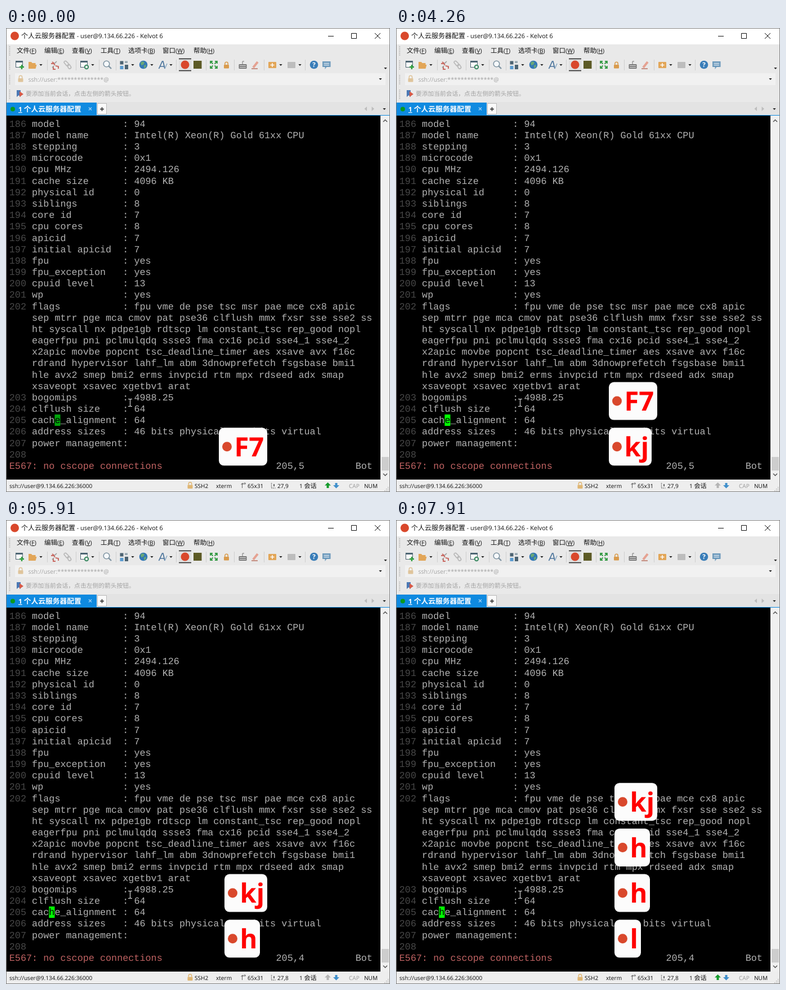
An HTML page for the animation above (8 s loop, 682 by 821 pixels).

```html
<!DOCTYPE html>
<html lang="zh-CN">
<head>
<meta charset="utf-8">
<title>Terminal key display</title>
<style>
html, body { margin: 0; width: 100%; height: 100%; overflow: hidden; background: #000; }
svg { display: block; width: 682px; height: 821px; }
text {
  font-family: "Open Sans", "Noto Sans CJK SC", "Noto Sans CJK", sans-serif;
  white-space: pre;
  text-rendering: geometricPrecision;
}
.mono { font: 16.8px "Liberation Mono", monospace; fill: #b2b2b2; }
.num { fill: #484848; }
.error { fill: #bf6262; }
.under { fill: #000; }
.key { font-weight: 700; font-size: 47px; fill: #f00; }
</style>
</head>
<body>
<svg id="stage" viewBox="0 0 682 821" xmlns="http://www.w3.org/2000/svg"></svg>
<script>
const LOGO = '#d9482c';
const COL = 10.08, ROW = 20.17, LEFT = 5.8, TOP = 159.4;

// Drawing helpers, each returning SVG markup
const rect = (x, y, w, h, color, extra = '') =>
  `<rect x="${x}" y="${y}" width="${w}" height="${h}" fill="${color}" ${extra}/>`;
const circle = (x, y, r, color, extra = '') =>
  `<circle cx="${x}" cy="${y}" r="${r}" fill="${color}" ${extra}/>`;
const fill = (d, color) => `<path d="${d}" fill="${color}"/>`;
const line = (d, color, width = 1, extra = '') =>
  `<path d="${d}" fill="none" stroke="${color}" stroke-width="${width}" ${extra}/>`;
const dotted = (d, color) => line(d, color, 1.5, 'stroke-dasharray="1.5"');
const caret = (x, y) => fill(`M${x - 2.7} ${y - 1}h5.4l-2.7 3z`, '#222');
const underline = s => `<tspan text-decoration="underline">${s}</tspan>`;

// Chinese runs are set slightly larger than the Latin ones
function label(x, y, str, size = 10.1, color = '#111', extra = '') {
  const runs = str.replace(/[\u3000-\u9fff\uff00-\uffef]+/g,
    s => `<tspan font-size="${size * 1.1}">${s}</tspan>`);
  return `<text x="${x}" y="${y}" font-size="${size}" fill="${color}" ${extra}>${runs}</text>`;
}
const mono = (col, row, str, kind = '') =>
  `<text class="mono ${kind}" x="${LEFT + col * COL}" y="${TOP + row * ROW + 15.4}">${str}</text>`;

const lock = (x, y, color) =>
  rect(x - 4.5, y - 1, 9, 6.5, color, 'rx="1"') +
  line(`M${x - 2.7} ${y - 1}v-2a2.7 2.7 0 0 1 5.4 0v2`, color, 1.5);
const folder = (x, y) =>
  fill(`M${x - 7} ${y - 6}h5l1.5 2h6v3h2l-2 7h-12.5z`, '#e2a658');
const windowIcon = (x, y) =>
  rect(x - 6.5, y - 6.5, 12, 11, '#fafafa', 'stroke="#4d6573"') +
  rect(x - 7, y - 7, 13, 3, '#4d6573');

function titleBar() {
  return rect(0, 0, 682, 29, '#fff') + circle(15.5, 14, 7.5, LOGO) +
    label(27, 18.3, '个人云服务器配置 - user@9.134.66.226 - Kelvot 6', 10.9) +
    line('M572 14.5h10M613.5 9.5h9v9h-9zM655 9l10 10M665 9l-10 10', '#111');
}

function menuBar() {
  const items = [[19, '文件', 'F'], [68, '编辑', 'E'], [117, '查看', 'V'], [168, '工具', 'T'],
    [217, '选项卡', 'B'], [278, '窗口', 'W'], [333, '帮助', 'H']];
  return items.map(([x, name, key]) => label(x, 44, `${name}(${underline(key)})`, 10.5)).join('');
}

function toolBar() {
  const separators = [73, 124, 165, 195, 302, 355, 405, 458, 531];
  const carets = [62, 154, 225, 259, 293, 488, 522];
  return separators.map(x => line(`M${x}.5 56v19`, '#cfcfcf')).join('') +
    carets.map(x => caret(x, 65)).join('') +
    windowIcon(24, 65) + line('M28 65v8M24 69h8', '#2f9e3e', 2.4) +
    folder(47, 66) +
    line('M82 60l4 3M80 63h5l2 3M88 67l5 1v4M84 68v5h4', '#c96a62', 2) +
    line('M90 59l-4 4M82 70l3-3', '#999', 1.6) +
    line('M103 61a2.5 2.5 0 0 1 4-2l4 4a2.5 2.5 0 0 1-4 3zM109 67a2.5 2.5 0 0 1 4-2l2 3a2.5 2.5 0 0 1-4 3z', '#b9b9b9', 1.7) +
    windowIcon(139, 65) + circle(143, 69, 3.2, '#eee', 'stroke="#3b8a62" stroke-width="2"') +
    circle(178.5, 63.5, 5.3, '#f6f9fb', 'stroke="#8095a3" stroke-width="1.6"') +
    line('M182 67l5 5', '#8095a3', 2.4) +
    rect(202.5, 58.5, 6, 6, '#4c6372') + rect(202.5, 67, 6, 6, '#5b9bd0') +
    rect(211, 58.5, 5, 3.5, '#9aa9b2') + rect(211, 65, 6, 8, '#4c6372') +
    circle(244, 65, 7.3, '#3378b5') +
    fill('M239 61l4-2 3 2-2 4-4 1zM245 66l4-1-1 5-3 1z', '#69a878') +
    line('M271.5 72l6-13h1.5l3 13M274 68h7', '#48729a', 1.7) + line('M282 72l4-9', '#8baac5', 1.5) +
    rect(307, 54, 22, 22, '#e0e0e0') + line('M307 54.5h22M307 75.5h22', '#222', 1.4) +
    circle(318, 65, 7.5, LOGO) + rect(333, 58, 14.5, 14, '#5c5a25') +
    line('M363 63v-4h4M371 59h4v4M375 67v4h-4M367 71h-4v-4M364 60l3.5 3.5M374 60l-3.5 3.5M374 70l-3.5-3.5M364 70l3.5-3.5', '#359a45', 1.8) +
    lock(391.5, 66, '#d99b4d') +
    rect(413.5, 64, 14, 8, '#777', 'rx="1"') + line('M415 66.5h11M415 69.5h11', '#e8e8e8') +
    line('M420 64v-5h3', '#777') +
    line('M439 70l8-10', '#e5a292', 4) + line('M436 72h11', '#b76a58', 1.4) +
    rect(466, 60, 14, 11, '#e2a658', 'rx="1"') + line('M473 62v7M469.5 65.5h7', '#fff', 1.5) +
    rect(500, 60, 14, 11, '#bdbdbd', 'rx="1"') +
    circle(547, 65, 7.3, '#397db8') +
    label(547, 69, '?', 11.5, '#fff', 'text-anchor="middle" font-weight="700"') +
    fill('M562 59h14.5v10h-7l-3 4v-4h-4.5z', '#6f9bbd') +
    line('M564.5 62.5h9.5M564.5 65.5h9.5', '#fff', 1.2) +
    caret(674, 71);
}

function addressBars() {
  return dotted('M6.5 32v18M6.5 57v18M6.5 83v17M6.5 109v17', '#aaa') +
    rect(16, 80, 658, 21, '#f1f1f1') +
    lock(26, 90, '#dfc49b') + label(39.5, 94.5, 'ssh://user:**************@', 10.6, '#a3a3a3') +
    caret(665, 90) +
    fill('M19 110h7v12l-3.5-3-3.5 3z', '#4b78b4') + fill('M24 112l7 5-7 5z', '#d65a48') +
    label(35, 120, '要添加当前会话，点击左侧的箭头按钮。', 9.8, '#a3a3a3');
}

function tabBar() {
  return rect(0, 131, 682, 24, '#e3e3e3') + rect(0, 154, 682, 1, '#0f8ae0') +
    rect(1, 132, 160, 23, '#0f8ae0') + circle(12, 143.5, 4, '#0b9a1d') +
    label(22, 148, `${underline('1')} 个人云服务器配置`, 11.6, '#fff', 'font-weight="700"') +
    line('M147 140.5l5 5M152 140.5l-5 5', '#a9d5f5', 1.1) +
    rect(162.5, 133.5, 16, 19, '#fafafa', 'stroke="#bbb"') +
    line('M167 143.5h7M170.5 140v7', '#222', 1.4) +
    fill('M641 139v8l-4.5-4zM649.5 139v8l4.5-4z', '#bdbdbd') + caret(672, 143);
}

const FIRST_LINE = 186;
const cpuInfo = [
  ['model', '94'], ['model name', 'Intel(R) Xeon(R) Gold 61xx CPU'], ['stepping', '3'],
  ['microcode', '0x1'], ['cpu MHz', '2494.126'], ['cache size', '4096 KB'], ['physical id', '0'],
  ['siblings', '8'], ['core id', '7'], ['cpu cores', '8'], ['apicid', '7'], ['initial apicid', '7'],
  ['fpu', 'yes'], ['fpu_exception', 'yes'], ['cpuid level', '13'], ['wp', 'yes'],
  ['flags', `fpu vme de pse tsc msr pae mce cx8 apic
sep mtrr pge mca cmov pat pse36 clflush mmx fxsr sse sse2 ss
ht syscall nx pdpe1gb rdtscp lm constant_tsc rep_good nopl
eagerfpu pni pclmulqdq ssse3 fma cx16 pcid sse4_1 sse4_2
x2apic movbe popcnt tsc_deadline_timer aes xsave avx f16c
rdrand hypervisor lahf_lm abm 3dnowprefetch fsgsbase bmi1
hle avx2 smep bmi2 erms invpcid rtm mpx rdseed adx smap
xsaveopt xsavec xgetbv1 arat`],
  ['bogomips', '4988.25'], ['clflush size', '64'], ['cache_alignment', '64'],
  ['address sizes', '46 bits physical, 48 bits virtual'], ['power management', '']
];

function terminal() {
  let row = 0, out = rect(0, 155, 666, 644, '#000');
  cpuInfo.forEach(([name, value], i) => {
    out += mono(0, row, FIRST_LINE + i, 'num');
    for (const text of `${name.padEnd(16)}: ${value}`.split('\n')) out += mono(4, row++, text);
  });
  return out + mono(0, row, FIRST_LINE + cpuInfo.length, 'num') +
    mono(0, 30, 'E567: no cscope connections', 'error') + mono(61, 30, 'Bot') +
    rect(665, 155, 17, 644, '#f0f0f0') + rect(667, 759, 13, 24, '#cdcdcd') +
    line('M670 166l3.5-3.5 3.5 3.5M670 788.5l3.5 3.5 3.5-3.5', '#555', 1.5);
}

function statusBar() {
  let grip = '';
  for (let i = 0; i < 3; i++)
    for (let j = 0; j <= i; j++) grip += rect(678 - j * 3, 812 + i * 3, 1.5, 1.5, '#b5b5b5');
  return rect(0, 799, 682, 22, '#eee') +
    label(6, 813.7, 'ssh://user@9.134.66.226:36000') +
    lock(327, 809.5, '#e0b673') + label(335, 813.7, 'SSH2') + label(373, 813.7, 'xterm') +
    line('M419.5 814v-8h6M417.5 808l2-2.5 2 2.5M423.5 804l2 2-2 2', '#666') +
    label(429, 813.7, '65x31') +
    dotted('M471.5 805v9h7', '#666') + rect(475, 807, 2, 4, '#666') +
    label(521, 813.7, '1 会话') +
    fill('M586.5 814.5l-5.5-5.5h3.5v-4h4v4h3.5z', '#3f8fcb') +
    label(609, 813.7, 'CAP', 10.1, '#999') + label(636, 813.7, 'NUM') + grip;
}

const frame = rect(0.5, 0.5, 681, 820, 'none', 'stroke="#808080"');
const pointer = line('M217 656.5h2.5l1 1 1-1h2.5M220.5 657v12M217 669.5h2.5l1-1 1 1h2.5', '#e8e8e8', 1.1);

const stage = document.getElementById('stage');
stage.innerHTML = rect(0, 0, 682, 821, '#e9e9e9') + titleBar() + menuBar() + toolBar() +
  addressBars() + tabBar() + terminal() + statusBar() +
  '<g id="live"></g>' + pointer + '<g id="cards"></g>' + frame;
const live = document.getElementById('live'), cards = document.getElementById('cards');

const cardWidth = { F7: 86, k: 60, kj: 76, h: 63, l: 47 };
function card(key, x, slot, opacity = 1) {
  const y = 707.3 - slot * 80.7;
  return `<g opacity="${opacity}">` + rect(x, y, cardWidth[key], 67, '#fcfcfc', 'rx="9"') +
    circle(x + 14.5, y + 33.5, 8.5, LOGO) +
    `<text class="key" x="${x + 27.5}" y="${y + 50.7}">${key}</text></g>`;
}

// Newest key sits in the lowest slot; the upload arrow is lit before "until"
const scenes = [
  { at: 0, until: 150, line: 205, col: 5, keys: ['F7'], x: 378, cursor: '#00a30a' },
  { at: 3100, until: 3330, line: 204, col: 5, keys: ['k', 'F7'], x: 378 },
  { at: 4030, until: 4260, line: 205, col: 5, keys: ['kj', 'F7'], x: 378 },
  { at: 4960, until: 0, line: 205, col: 5, keys: ['kj', 'F7'], x: 378, fade: 0.06 },
  { at: 5360, until: 5510, line: 205, col: 4, keys: ['h', 'kj'], x: 378 },
  { at: 5910, until: 0, line: 205, col: 4, keys: ['h', 'kj'], x: 388 },
  { at: 6520, until: 6750, line: 205, col: 3, keys: ['h', 'h', 'kj'], x: 388 },
  { at: 7910, until: 8000, line: 205, col: 4, keys: ['l', 'h', 'h', 'kj'], x: 388 }
];

function drawScene(s, sending) {
  const row = s.line - 179, col = s.col + 3;
  const letter = cpuInfo[s.line - FIRST_LINE][0][s.col - 1];
  live.innerHTML =
    rect(LEFT + col * COL, TOP + row * ROW, COL, ROW, s.cursor || '#0f0') +
    mono(col, row, letter, 'under') +
    mono(47, 30, `${s.line},${s.col}`) +
    label(482, 813.7, `${s.line - 178},${s.col + 4}`) +
    fill('M571.5 804l-5.5 5.5h3.5v4.5h4v-4.5h3.5z', sending ? '#149b2c' : '#b4b4b4');
  cards.innerHTML = s.keys.map((key, slot) =>
    card(key, s.x, slot, key === 'F7' ? s.fade : 1)).join('');
}

const start = performance.now();
let shown = '';
function tick() {
  const t = (performance.now() - start) % 8000;
  const scene = scenes.findLast(s => s.at <= t);
  const sending = t < scene.until;
  const state = scene.at + ':' + sending;
  if (state !== shown) drawScene(scene, sending);
  shown = state;
  requestAnimationFrame(tick);
}
tick();
</script>
</body>
</html>
```
